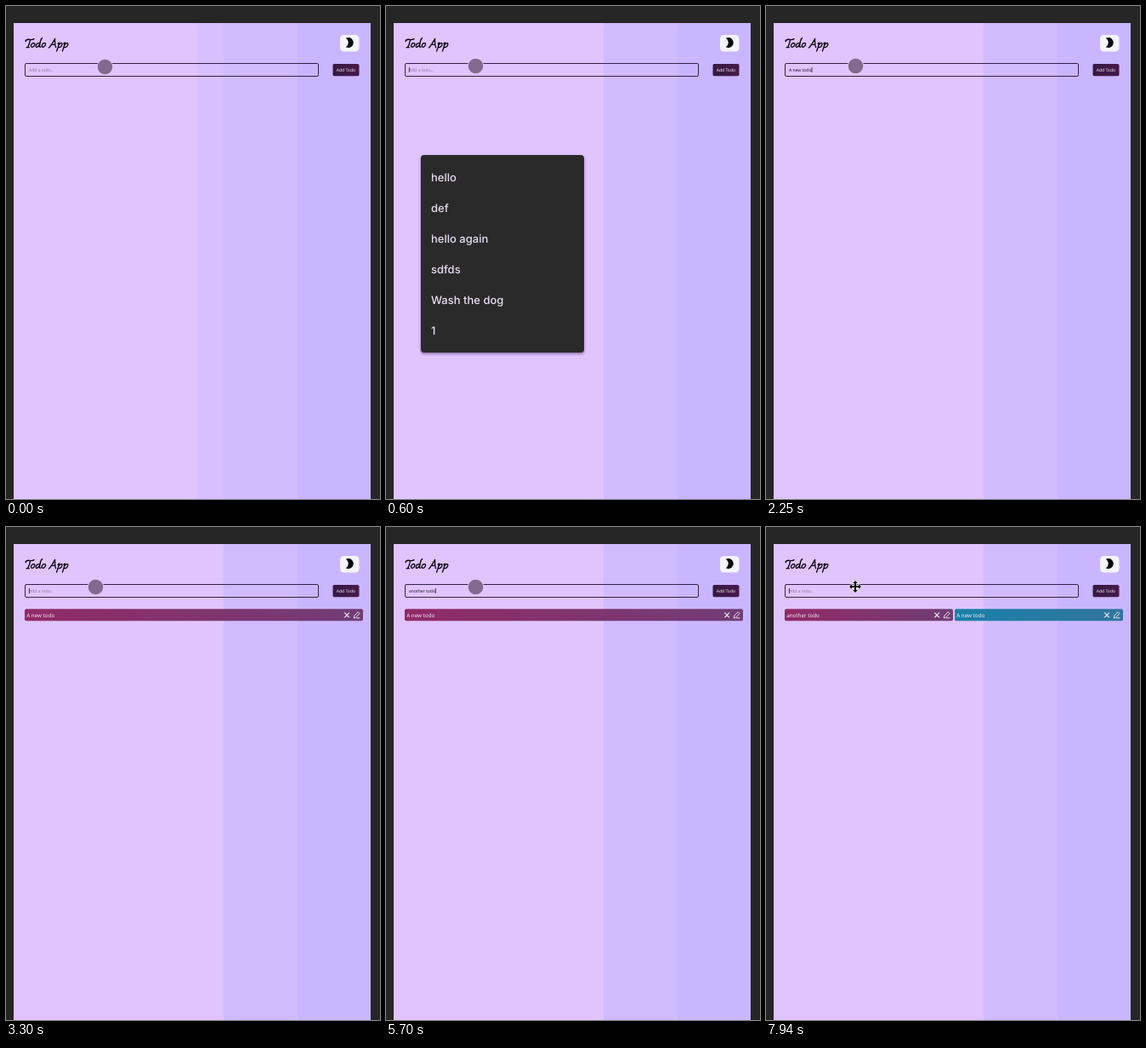
These frames come from a looping animation (440 by 579 pixels, 8000 ms). An HTML page:

```html
<!DOCTYPE html>
<html lang="en">
<head>
<meta charset="utf-8">
<title>Todo App</title>
<style>
  html, body { margin: 0; width: 100%; height: 100%; overflow: hidden; background: #262626; }
  svg { display: block; width: 100%; height: 100%; }
  text { font-family: "Noto Sans", sans-serif; text-rendering: geometricPrecision; white-space: pre; }
  .field { font-size: 5px; fill: #1c1328; }
  .hint { fill: #907c9f; }
  .menu text { font: 500 13px Inter, sans-serif; fill: #e6def2; }
  .item text { font-size: 6.25px; fill: #f6eef6; }
  .icon { fill: none; stroke: #f6eef6; stroke-linecap: round; stroke-linejoin: round; }
  .title { fill: none; stroke: #0d0614; stroke-width: 1.35; stroke-linecap: round; stroke-linejoin: round; }
</style>
</head>
<body>
<svg viewBox="0 0 440 579" preserveAspectRatio="none">
  <defs>
    <linearGradient id="plum"><stop stop-color="#902a66"/><stop offset="1" stop-color="#703d75"/></linearGradient>
    <linearGradient id="teal"><stop stop-color="#1a80a8"/><stop offset="1" stop-color="#31759d"/></linearGradient>
    <linearGradient id="night"><stop stop-color="#341a40"/><stop offset="1" stop-color="#481a4c"/></linearGradient>
    <filter id="shade" x="-10%" y="-10%" width="120%" height="120%">
      <feDropShadow dx="0" dy="1.5" stdDeviation="1.5" flood-color="#2a1640" flood-opacity=".5"/>
    </filter>
    <path id="o" d="M33 43.6C30.5 43 28.9 46 29.6 47.6C30.4 49.4 33.6 47.6 33.8 45C33.9 44 33.5 43.6 33 43.6"/>
    <path id="p" d="M61 44L62.6 43C62 46 60.8 50 59.6 53M62.2 45.6C63.5 43.4 66.2 42.6 66 45C65.8 47.3 63.2 49.4 61.6 48.2"/>
  </defs>

  <path fill="#262626" d="M0 0H440V579H0z"/>
  <path fill="#e0c4fe" d="M9 20H256V579H9z"/>
  <path id="band" fill="#d8bfff" d="M225 20H256V579H225z"/>
  <path fill="#d0bbff" d="M256 20H343V579H256z"/>
  <path fill="#c9b6ff" d="M343 20H429V579H343z"/>

  <g class="title" role="img" aria-label="Todo App">
    <path d="M23 41.5C23.5 39.2 25.5 38.9 28 39.4S32 39.6 33 38.6M28.5 39.6C28 43 27 46 25.6 48.6M24.2 48.7Q25.6 48.2 27.2 48.6"/>
    <use href="#o"/>
    <path d="M39.6 43.8C37 42.8 35 45.5 35.2 47.4C35.5 49.3 38 48 39.6 45M42.6 37.6C42 38 41 39 40.6 41L39.3 47Q39.2 48.8 41 47.8"/>
    <use href="#o" x="12.7"/>
    <path d="M50.4 49C52.5 47.5 55.5 42 57.6 38.4C57.4 42 57.6 46 58.6 48.6M53 45.4H57.8"/>
    <use href="#p"/>
    <use href="#p" x="6.8"/>
  </g>

  <rect x="393" y="34" width="22.5" height="19.5" rx="4.5" fill="#f4f5ff"/>
  <path fill="#08060c" transform="translate(397 35.8) scale(.6)"
    d="M9.5 2c-1.82 0-3.53.5-5 1.35 2.99 1.73 5 4.95 5 8.65s-2.01 6.92-5 8.65c1.47.85 3.18 1.35 5 1.35 5.52 0 10-4.48 10-10S15.02 2 9.5 2z"/>

  <rect x="22.5" y="67.5" width="345" height="15" rx="1.5" fill="none" stroke="#35204b"/>
  <text id="hint" class="field hint" x="27" y="77">Add a todo...</text>
  <text id="typed" class="field" x="27" y="77"></text>
  <path id="caret" d="M27.4 72V78" stroke="#1c1328" stroke-width=".8"/>
  <rect x="384.5" y="68" width="31" height="14.3" rx="1.8" fill="url(#night)"/>
  <text class="field" x="388.8" y="77" style="fill:#f1e8f4">Add Todo</text>

  <g id="one"></g>
  <g id="two"></g>
  <g id="menu" class="menu">
    <rect x="41" y="175" width="192" height="232" rx="4" fill="#292a2b" filter="url(#shade)"/>
  </g>

  <circle id="dot" r="9.2" fill="#81698f" stroke="#e9d8f8" stroke-opacity=".75"/>
  <path id="move" transform="translate(105 70)" fill="#08060c" stroke="#fff" stroke-width="1.1" paint-order="stroke"
    d="M0-7L3-4H1V-1H4V-3L7 0L4 3V1H1V4H3L0 7L-3 4H-1V1H-4V3L-7 0L-4-3V-1H-1V-4H-3z"/>
</svg>
<script>
const LOOP = 8000;
const $ = id => document.getElementById(id);

// [time, text, caret shown]
const typing = [
  [0, "", 0], [600, "", 1],
  [1050, "A", 1], [1200, "A ", 1], [1350, "A n", 1], [1500, "A ne", 1],
  [1650, "A new", 1], [1800, "A new ", 1], [1950, "A new to", 1],
  [2100, "A new tod", 1], [2250, "A new todo", 1], [2700, "A new todo", 0],
  [3300, "", 1], [3750, "", 0],
  [4050, "a", 1], [4200, "an", 1], [4350, "ano", 1],
  [4650, "anot", 1], [4800, "anoth", 1], [4950, "anothe", 1],
  [5100, "another", 1], [5250, "another ", 1],
  [5550, "another to", 1], [5700, "another todo", 1],
  [6000, "", 1], [6140, "", 0], [6740, "", 1], [7190, "", 0], [7640, "", 1]
];

const item = (x, width, label, paint) => {
  const end = x + width;
  return `<g class="item">
    <rect x="${x}" y="96.3" width="${width}" height="13.9" rx="2" fill="url(#${paint})"/>
    <text x="${x + 2.2}" y="105.5">${label}</text>
    <path class="icon" stroke-width="1.1" d="M${end - 21.4} 100.8l5 5m0-5l-5 5"/>
    <path class="icon" stroke-width=".9" d="M${end - 10.7} 106.7l.5-2.6l4.4-4.4l1.9 1.9l-4.4 4.4zM${end - 7.6} 106.9h3.6"/>
  </g>`;
};

$("one").innerHTML = item(22, 398, "A new todo", "plum");
$("two").innerHTML = item(22, 198, "another todo", "plum") + item(222, 198, "A new todo", "teal");
$("menu").innerHTML += ["hello", "def", "hello again", "sdfds", "Wash the dog", "1"]
  .map((word, i) => `<text x="53" y="${206 + 36 * i}">${word}</text>`).join("");

const show = (id, on) => { $(id).style.display = on ? "" : "none"; };

function draw(t) {
  const [, text, caret] = typing.findLast(step => step[0] <= t);
  const typed = $("typed");
  if (typed.textContent !== text) typed.textContent = text;
  const shift = text ? typed.getComputedTextLength() : 0;
  $("caret").setAttribute("transform", `translate(${shift} 0)`);
  $("dot").setAttribute("transform", t < 150 ? "translate(116.5 71.5)" : "translate(105.5 70.5)");

  show("caret", caret);
  show("hint", !text);
  show("band", t < 600);
  show("menu", t >= 600 && t < 1050);
  show("one", t >= 3300 && t < 6000);
  show("two", t >= 6000);
  show("dot", t < 7940);
  show("move", t >= 7940);
}

const start = performance.now();
function tick() {
  draw((performance.now() - start) % LOOP);
  requestAnimationFrame(tick);
}
tick();
</script>
</body>
</html>
```
